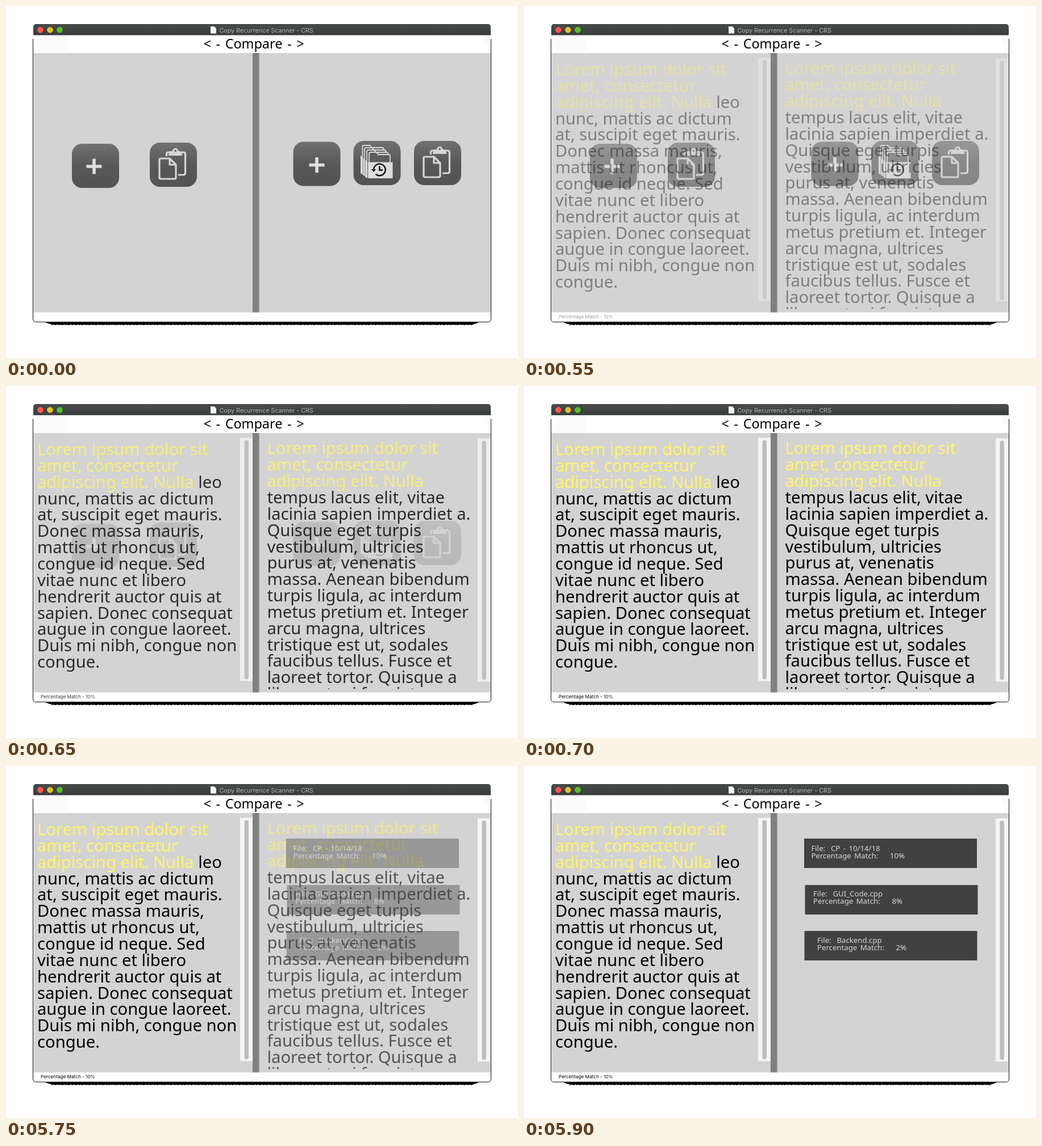
These frames come from a looping animation (901x621 px, 8000 ms). An HTML page:

```html
<!DOCTYPE html>
<html lang="en">
<head>
<meta charset="utf-8">
<title>Compare</title>
<style>
html, body { margin: 0; width: 100%; height: 100%; overflow: hidden; background: #fff; }
svg { display: block; }
text { font-family: "Noto Sans", "Open Sans", sans-serif; white-space: pre; }
.ui { font-family: Inter, Roboto, sans-serif; }
.body { font-size: 29.2px; }
.card { font-size: 13.2px; word-spacing: 2px; fill: #d8d8d8; }
.yellow { fill: #fff565; }

.icons, .result, .lorem, .cards { animation: 8s step-end infinite; }
.icons { animation-name: icons; }
.result { animation-name: result; }
.lorem { animation-name: lorem; }
.cards { animation-name: cards; }

/* Two five-step dissolves: 500-700 ms and 5700-5900 ms */
@keyframes icons {
  0% { opacity: 1; } 6.25% { opacity: .8; } 6.875% { opacity: .6; }
  7.5% { opacity: .4; } 8.125% { opacity: .2; } 8.75%, 100% { opacity: 0; }
}
@keyframes result {
  0% { opacity: 0; } 6.25% { opacity: .2; } 6.875% { opacity: .4; }
  7.5% { opacity: .6; } 8.125% { opacity: .8; } 8.75%, 100% { opacity: 1; }
}
@keyframes lorem {
  0%, 71.25% { opacity: 1; } 71.25% { opacity: .8; } 71.875% { opacity: .6; }
  72.5% { opacity: .4; } 73.125% { opacity: .2; } 73.75%, 100% { opacity: 0; }
}
@keyframes cards {
  0% { opacity: 0; } 71.25% { opacity: .2; } 71.875% { opacity: .4; }
  72.5% { opacity: .6; } 73.125% { opacity: .8; } 73.75%, 100% { opacity: 1; }
}
</style>
</head>
<body>
<svg width="901" height="621" viewBox="0 0 901 621">
  <defs>
    <linearGradient id="bar" x2="0" y2="1">
      <stop stop-color="#4a4d4d"/><stop offset="1" stop-color="#393b3b"/>
    </linearGradient>
    <linearGradient id="key" x2="0" y2="1">
      <stop stop-color="#717171"/><stop offset=".5" stop-color="#585858"/><stop offset="1" stop-color="#535353"/>
    </linearGradient>
    <clipPath id="pane"><rect x="446" y="83" width="406" height="452"/></clipPath>
    <rect id="button" width="83" height="78" rx="18" fill="url(#key)"/>
    <path id="plus" d="M-13.5 0H13.5M0-13.5V13.5" stroke="#dfdfdf" stroke-width="5.6"/>
    <g id="paste">
      <use href="#button"/>
      <g fill="none" stroke="#d6d6d6" stroke-width="3.2" stroke-linejoin="round">
        <path d="M29.5 24V20.500q0-3.500 3.500-3.500H59q3.500 0 3.500 3.500V53.500q0 3.500-3.500 3.500H50"/>
        <path d="M17 30.500q0-2.500 2.500-2.500H35L46 39V61.500q0 2.500-2.500 2.500H19.500q-2.500 0-2.500-2.500ZM35 28V39H46"/>
      </g>
      <path d="M33 23q0-8 7-8.500q1-4.800 5.200-4.800t5.200 4.800q7 .5 7 8.500Z" fill="#d6d6d6"/>
      <circle cx="45.200" cy="14.500" r="1.800" fill="#606060"/>
    </g>
    <path id="folder" d="M0 44V3q0-2 2-2H13l3 4H35q2 0 2 2V44" fill="#5d5d5d" stroke="#dcdcdc" stroke-width="1.800"/>
    <g id="history">
      <use href="#button"/>
      <use href="#folder" x="16" y="7"/>
      <use href="#folder" x="19.500" y="11"/>
      <use href="#folder" x="23.500" y="15"/>
      <use href="#folder" x="27.500" y="19"/>
      <path d="M12.500 25L24.500 37V66L12.500 57Z" fill="#dcdcdc"/>
      <path d="M16.500 27V60M20.500 31V63" stroke="#666" stroke-width=".8"/>
      <rect x="25.500" y="37.500" width="43.500" height="28.500" rx="1" fill="#dcdcdc"/>
      <g fill="none" stroke="#111" stroke-width="2.400">
        <path d="M35.500 51A10.300 10.300 0 1 1 39 58.600M45.800 44.500V51.500H51.500"/>
      </g>
      <path d="M31.500 50H39.500L35.500 55Z" fill="#111"/>
    </g>
    <g id="scroll">
      <rect width="22" height="429" fill="#f5f5f5"/>
      <rect x="7.500" y="4" width="7.500" height="422" rx="3.750" fill="#bdbdbd"/>
    </g>
  </defs>

  <!-- Window -->
  <path d="M68 557H833Q828 562 814 562H88Q74 562 68 557Z"/>
  <path d="M80 562.300H822" stroke="#000" stroke-width="1.600" stroke-dasharray="2 1 1 1 3 1 1 2"/>
  <path d="M47.500 58V552Q47.500 557.500 53 557.500H848Q853.500 557.500 853.500 552V58" fill="#fff" stroke="#111"/>
  <rect x="48" y="50" width="805" height="34" fill="#fff"/>
  <path d="M48 51.500V37Q48 32 53 32H848Q853 32 853 37V51.500Z" fill="url(#bar)"/>
  <path d="M51 32.500H850" stroke="#2b2d2d"/>
  <circle cx="60.500" cy="42.300" r="5.300" fill="#fc5b50"/>
  <circle cx="77.500" cy="42.300" r="5.300" fill="#e5bf2c"/>
  <circle cx="94.500" cy="42.300" r="5.300" fill="#53c22c"/>
  <path d="M360 36H366.500L370 39.500V48.500H360Z" fill="#f8f8f8"/>
  <path d="M366.500 36V39.500H370" fill="#d0d0d0"/>
  <text class="ui" x="375.500" y="46.500" font-size="10.7" fill="#b4b6b6">Copy Recurrence Scanner - CRS</text>
  <path d="M55 54H110V82H55ZM841 54H852V68H841Z" fill="#fbfbfb"/>
  <text x="436" y="75" font-size="23.4" word-spacing="2.6" text-anchor="middle">&lt; - Compare - &gt;</text>
  <rect x="48.500" y="83" width="804.500" height="457.500" fill="#d3d3d3"/>
  <rect x="434" y="83" width="11.500" height="457.500" fill="#808080"/>

  <g class="icons">
    <use href="#button" x="116" y="243"/>
    <use href="#plus" x="155" y="283"/>
    <use href="#paste" x="253" y="241"/>
    <use href="#button" x="505.500" y="239.500"/>
    <use href="#plus" x="547" y="280.500"/>
    <use href="#history" x="611.500" y="238"/>
    <use href="#paste" x="718" y="238"/>
  </g>

  <g class="result">
    <use href="#scroll" x="412" y="91.500"/>
    <use href="#scroll" x="830" y="92.500"/>
    <text class="ui" x="61" y="551" font-size="8.2">Percentage Match - 10%</text>
    <g id="left"></g>
    <g class="lorem" clip-path="url(#pane)"><g id="right"></g></g>
  </g>
  <g class="cards" id="cards"></g>
</svg>
<script>
const byId = id => document.getElementById(id);
const opening = ["Lorem ipsum dolor sit", "amet, consectetur"];
const marked = "adipiscing elit. Nulla";
const pitch = 28.85;

function setLines(id, x, y, tail, rest) {
  const lines = [...opening, marked].map(s => `<tspan class="yellow">${s}</tspan>`);
  lines[2] += tail;
  byId(id).innerHTML = lines.concat(rest.split("|")).map((s, i) =>
    `<text class="body" x="${x}" y="${y + i * pitch}">${s}</text>`).join("");
}

setLines("left", 55, 122, " leo",
  "nunc, mattis ac dictum|at, suscipit eget mauris.|Donec massa mauris,|" +
  "mattis ut rhoncus ut,|congue id neque. Sed|vitae nunc et libero|" +
  "hendrerit auctor quis at|sapien. Donec consequat|augue in congue laoreet.|" +
  "Duis mi nibh, congue non|congue.");

setLines("right", 459.5, 120.4, "",
  "tempus lacus elit, vitae|lacinia sapien imperdiet a.|Quisque eget turpis|" +
  "vestibulum, ultricies|purus at, venenatis|massa. Aenean bibendum|" +
  "turpis ligula, ac interdum|metus pretium et. Integer|arcu magna, ultrices|" +
  "tristique est ut, sodales|faucibus tellus. Fusce et|laoreet tortor. Quisque a|" +
  "libero ut mi feugiat.");

function card(x, y, textX, textY, file, match) {
  const put = (dx, dy, s) =>
    `<text class="card" x="${textX + dx}" y="${textY + dy}">${s}</text>`;
  return `<rect x="${x}" y="${y}" width="304" height="52" fill="#414141"/>` +
    put(0, 0, "File:") + put(34.5, 0, file) +
    put(0, 13, "Percentage Match:") + put(138.5, 13, match);
}

byId("cards").innerHTML =
  card(493, 128, 505.5, 150, "CP - 10/14/18", "10%") +
  card(494.5, 210, 509, 230, "GUI_Code.cpp", "8%") +
  card(493.5, 291, 516, 312, "Backend.cpp", "2%");
</script>
</body>
</html>
```
